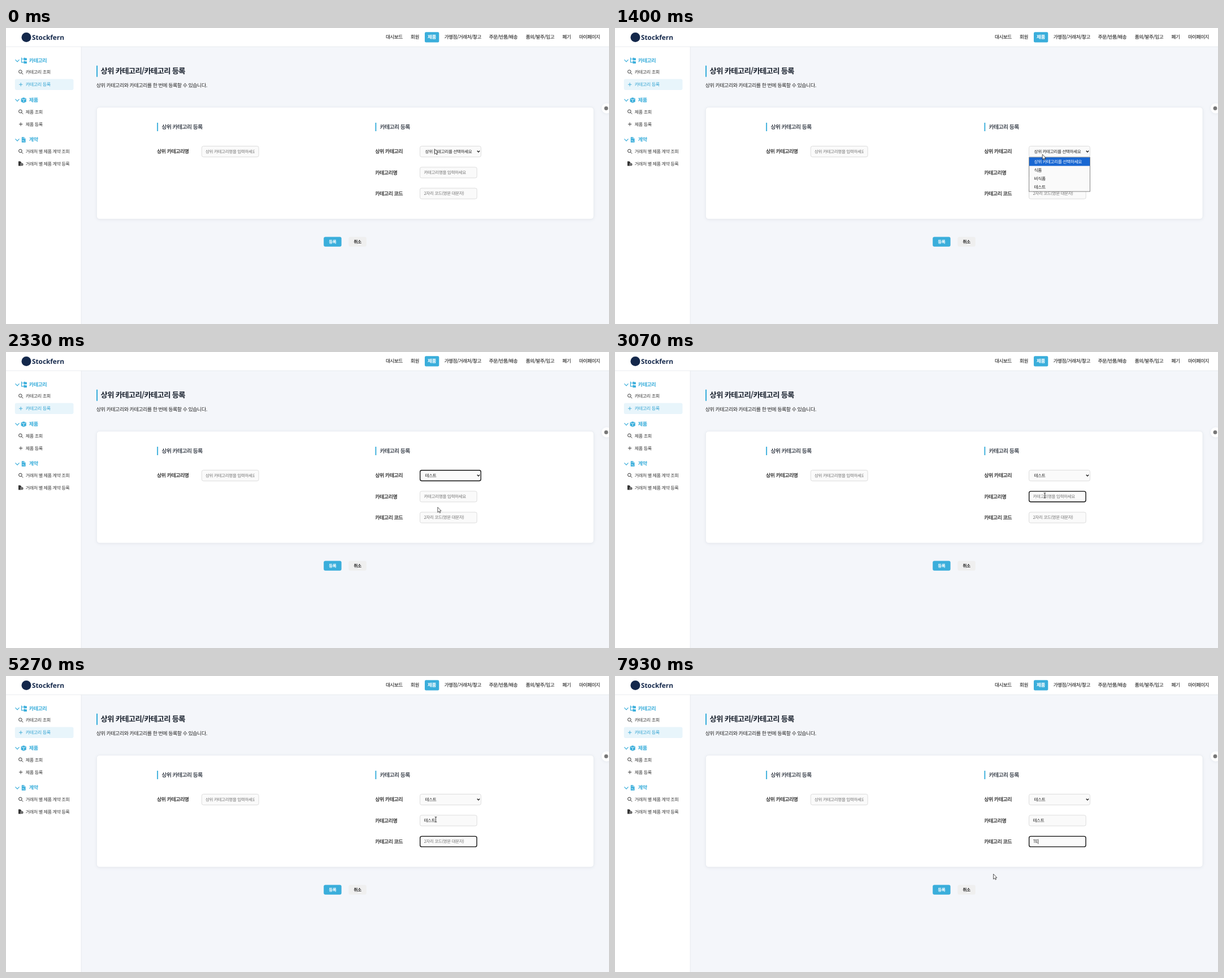
Write an HTML page that moves like this. It is 1067x525 px and loops after 8 s.

```html
<!DOCTYPE html>
<html lang="ko">
<head>
<meta charset="utf-8">
<title>카테고리 등록</title>
<style>
  html, body { margin: 0; width: 100%; height: 100%; overflow: hidden; background: #f4f6fa; }
  svg.stage { display: block; width: 100vw; height: 100vh; }
  text {
    font-family: "Noto Sans CJK KR", "Noto Sans KR", "Noto Sans CJK", sans-serif;
    letter-spacing: -.056em;
    text-rendering: geometricPrecision; fill: #222; white-space: pre;
  }
  .brand { font: 700 11.8px "Open Sans", sans-serif; letter-spacing: 0; fill: #14284b; }
  .nav text { font-size: 8.6px; stroke: #222; stroke-width: .08; }
  .nav text.on { fill: #fff; stroke: none; font-weight: 700; }
  .side text { font-size: 8.13px; fill: #3a3a3a; }
  .side text.on { fill: #38a6d3; }
  .side text.group { font-size: 9.08px; font-weight: 600; fill: #3aaedb; }
  text.title { font-size: 13.4px; font-weight: 600; fill: #1c2430; }
  text.lead { font-size: 9.05px; }
  text.head { font-size: 9.85px; fill: #1c2430; stroke: #1c2430; stroke-width: .18; }
  text.label { font-size: 9px; stroke: #222; stroke-width: .22; }
  text.hint, text.value { font-size: 7.65px; }
  text.hint { fill: #757575; }
  text.option { font-size: 7.8px; }
  text.option.on { fill: #fff; }
  text.button { font-size: 7.7px; font-weight: 600; text-anchor: middle; }
  .accent { fill: #3aaedb; }
  .line { fill: none; stroke: #3aaedb; stroke-width: 1.2; }
  .dark { fill: none; stroke: #333; stroke-width: 1; }
  .field { fill: #fafafa; stroke: #d0d0d0; stroke-width: .7; }
  .ring { fill: none; stroke: #101010; stroke-width: 1.35; }
  .caret { fill: #111; }
  .card { filter: drop-shadow(0 1px 2.5px rgba(30, 50, 80, .07)); }
</style>
</head>
<body>
<svg class="stage" viewBox="0 0 1067 525" preserveAspectRatio="none">
  <defs>
    <path id="chevron" class="line" d="M16.5 -1.8l3.5 3.7l3.5-3.7"/>
    <g id="search" class="dark"><circle cx="25.4" cy="-.6" r="2.8"/><path d="M27.5 1.5l2.7 2.7"/></g>
    <path id="plus" d="M23 0h6.4M26.2-3.2v6.4" stroke-width=".9"/>
  </defs>

  <rect width="1067" height="525" fill="#f4f6fa"/>
  <path d="M0 0H1067V33H133V525H0z" fill="#fff"/>
  <path d="M0 33.2H1067M133.2 33V525" fill="none" stroke="#e4e7ec" stroke-width=".8"/>

  <circle cx="36" cy="16.4" r="8.5" fill="#14284b"/>
  <text class="brand" x="46" y="20.6">Stockfern</text>

  <g class="nav">
    <rect class="accent" x="741" y="7.2" width="25.3" height="18.2" rx="2.2"/>
    <text x="671.9" y="19.2">대시보드</text>
    <text x="716.1" y="19.2">회원</text>
    <text x="746" y="19.2" class="on">제품</text>
    <text x="775.7" y="19.2">가맹점/거래처/창고</text>
    <text x="854.8" y="19.2">주문/반품/배송</text>
    <text x="919.8" y="19.2">품의/발주/입고</text>
    <text x="984.5" y="19.2">폐기</text>
    <text x="1013.9" y="19.2">마이페이지</text>
  </g>

  <g class="side">
    <rect x="15.8" y="90.6" width="103.7" height="19.4" rx="3" fill="#e8f5fb"/>
    <use href="#chevron" y="58"/><use href="#chevron" y="128"/><use href="#chevron" y="198.4"/>

    <path class="line" d="M27.5 52.6v8.2h4M27.5 55h4"/>
    <path class="accent" d="M31.4 52.8h2.2l.7.8h2.6v3.7h-5.5zM31.4 58.4h2.2l.7.8h2.6v3.7h-5.5z"/>
    <text class="group" x="40.8" y="60.9">카테고리</text>

    <path class="accent" d="M31.2 123.2l4.6 1.7v5.8l-4.6 2.2l-4.6-2.2v-5.8z"/>
    <path d="M27.6 125.8l3.6 1.4l3.6-1.4M31.2 127.2v4.6" fill="none" stroke="#fff" stroke-width=".8"/>
    <text class="group" x="40.8" y="131">제품</text>

    <path class="accent" d="M27.8 193.6h4.2l2.6 2.6v6.8h-6.8z"/>
    <path d="M32 193.6v2.6h2.6M29 196h1.8M29 201l1.4-2l1 2h2" fill="none" stroke="#fff" stroke-width=".7"/>
    <text class="group" x="40.8" y="201.4">계약</text>

    <use href="#search" y="78"/><use href="#search" y="148.4"/><use href="#search" y="218.6"/>
    <use href="#plus" y="100.2" stroke="#38a6d3"/><use href="#plus" y="170.6" stroke="#333"/>
    <path d="M22 236.6h3.4l1.9 1.9v6h-5.3z" fill="#333"/>
    <circle cx="28.3" cy="242" r="2.5" fill="#333" stroke="#fff" stroke-width=".6"/>
    <circle cx="28.3" cy="242" r=".8" fill="#fff"/>

    <text x="34.8" y="81.1">카테고리 조회</text>
    <text x="34.8" y="103.3" class="on">카테고리 등록</text>
    <text x="34.8" y="151.5">제품 조회</text>
    <text x="34.8" y="173.6">제품 등록</text>
    <text x="34.8" y="221.7">거래처 별 제품 계약 조회</text>
    <text x="34.8" y="243.5">거래처 별 제품 계약 등록</text>
  </g>

  <rect class="accent" x="160" y="66.7" width="2.1" height="20"/>
  <text class="title" x="167.6" y="81.3">상위 카테고리/카테고리 등록</text>
  <text class="lead" x="159.8" y="105.2">상위 카테고리와 카테고리를 한 번에 등록할 수 있습니다.</text>

  <rect class="card" x="160.5" y="140.5" width="879.5" height="198.4" rx="5" fill="#fff" stroke="#e6e9ee" stroke-width=".7"/>
  <rect class="accent" x="267.2" y="168" width="1.9" height="15"/>
  <rect class="accent" x="653.4" y="168" width="1.9" height="15"/>
  <text class="head" x="275.4" y="179.1">상위 카테고리 등록</text>
  <text class="head" x="661.5" y="179.1">카테고리 등록</text>

  <text class="label" x="267.1" y="221.8">상위 카테고리명</text>
  <text class="label" x="653.3" y="221.8">상위 카테고리</text>
  <text class="label" x="653.3" y="259.7">카테고리명</text>
  <text class="label" x="653.3" y="296.9">카테고리 코드</text>

  <rect class="field" x="346.4" y="209.5" width="100.8" height="19.2" rx="3"/>
  <svg x="353" y="210" width="87" height="18"><text class="hint" x="0" y="11.8">상위 카테고리명을 입력하세요</text></svg>

  <rect class="field" x="732.5" y="209.5" width="108" height="19.2" rx="3"/>
  <path d="M833.8 217.8l2.2 2.3l2.2-2.3" fill="none" stroke="#111" stroke-width="1.3"/>
  <text class="value" x="741.6" y="221.8" data-on="0-2130">상위 카테고리를 선택하세요</text>
  <text class="value" x="741.6" y="221.8" data-on="2130-8000">테스트</text>
  <rect class="ring" x="732.7" y="209.7" width="107.6" height="18.8" rx="3" data-on="2130-2530"/>

  <rect class="field" x="732.5" y="246.9" width="100.8" height="19" rx="3"/>
  <text class="hint" x="739.5" y="259.2" data-on="0-3330">카테고리명을 입력하세요</text>
  <rect id="compose" y="252.4" width="6.8" height="8.8" fill="#c9ced4" data-on="3330-4730"/>
  <text id="name" class="value" x="739.5" y="259.4"></text>
  <rect class="ring" x="732.7" y="247.1" width="100.4" height="18.6" rx="3" data-on="2530-4730"/>
  <rect class="caret" x="739.3" y="252.4" width=".7" height="8.6" data-on="2530-3070"/>

  <rect class="field" x="732.5" y="284.1" width="100.8" height="19" rx="3"/>
  <text class="hint" x="739.5" y="296.3" data-on="0-6530">2자리 코드(영문 대문자)</text>
  <text id="code" class="value" x="739.7" y="296.3"></text>
  <rect class="ring" x="732.7" y="284.3" width="100.4" height="18.6" rx="3" data-on="4730-8000"/>
  <rect class="caret" x="739.3" y="289.4" width=".7" height="8.6" data-on="4730-5270 5800-6330"/>
  <rect class="caret" x="744.1" y="289.4" width=".7" height="8.6" data-on="6530-6730"/>
  <rect class="caret" x="748.5" y="289.4" width=".7" height="8.6" data-on="6730-7270 7800-8000"/>

  <rect class="accent" x="562.2" y="370.6" width="31.4" height="17.2" rx="3"/>
  <rect x="606.4" y="370.6" width="31.4" height="17.2" rx="3" fill="#efefef"/>
  <text class="button" x="577.8" y="382.3" style="fill:#fff">등록</text>
  <text class="button" x="622" y="382.3">취소</text>

  <circle class="card" cx="1063" cy="142.4" r="9" fill="#fff"/>
  <circle cx="1062" cy="142.4" r="3.4" fill="#777"/>

  <g data-on="1200-2130">
    <rect x="732.7" y="229.2" width="107.8" height="60.8" fill="#fafafa" stroke="#666" stroke-width=".8"/>
    <rect id="pick" x="733" y="229.5" width="107.2" height="15.1" fill="#1967d2"/>
    <text class="option" x="741.6" y="239.9">상위 카테고리를 선택하세요</text>
    <text class="option" x="741.6" y="254.9">식품</text>
    <text class="option" x="741.6" y="269.9">비식품</text>
    <text class="option" x="741.6" y="284.9">테스트</text>
  </g>

  <g id="cursor">
    <path id="arrow" d="M0 0V9.1L2.1 7.2L3.5 10.1L4.9 9.5L3.6 6.6H6.3z" fill="#fff" stroke="#111" stroke-width=".7"/>
    <path id="beam" d="M-1.9-4.4H1.9M-1.9 4.4H1.9M0-4.4V4.4" fill="none" stroke="#222" stroke-width=".85"/>
  </g>
</svg>

<script>
  const LOOP = 8000, TICK = 200 / 3;
  const $ = id => document.getElementById(id);
  const show = (el, on) => { el.style.display = on ? '' : 'none'; };

  // time, x, y of the pointer's hot spot
  const path = [
    [0, 758.4, 214.6], [200, 755.4, 217.6], [1260, 755.4, 217.6],
    [2000, 764.6, 287], [2200, 764.6, 287], [2530, 762.6, 254.3],
    [2600, 762.6, 254.3], [2660, 760.5, 254.5], [7730, 760.5, 254.5],
    [7930, 669.6, 351.2], [LOOP, 669.6, 351.2]
  ];
  const nameKeys = [[3330, 'ㅌ'], [3400, '테'], [3800, '텟'], [3930, '테스'], [4130, '테슽'], [4270, '테스트']];
  const codeKeys = [[6530, 'T'], [6730, 'TE']];

  const options = [...document.querySelectorAll('.option')];
  const timed = [...document.querySelectorAll('[data-on]')].map(el => ({
    el, spans: el.dataset.on.split(' ').map(s => s.split('-').map(Number))
  }));

  const typed = (keys, t) => keys.reduce((text, [at, next]) => t >= at ? next : text, '');

  function pointer(t) {
    const q = Math.min(LOOP, Math.floor(t / TICK + .1) * TICK);
    const i = Math.max(1, path.findIndex(p => p[0] >= q));
    const [t0, x0, y0] = path[i - 1], [t1, x1, y1] = path[i];
    const u = (q - t0) / (t1 - t0), e = u * u * (3 - 2 * u);
    return [x0 + (x1 - x0) * e, y0 + (y1 - y0) * e];
  }

  function render(t) {
    for (const { el, spans } of timed) show(el, spans.some(([a, b]) => t >= a && t < b));

    const name = typed(nameKeys, t);
    $('name').textContent = name;
    $('compose').setAttribute('x', 739.4 + 6.6 * Math.max(0, name.length - 1));
    $('code').textContent = typed(codeKeys, t);

    const [x, y] = pointer(t);
    const open = t >= 1200 && t < 2130;
    const row = Math.max(0, Math.min(3, Math.floor((y - 229.5) / 15)));
    $('pick').setAttribute('y', 229.5 + 15 * row);
    options.forEach((o, i) => o.classList.toggle('on', i === row));

    const overInput = !open && x > 732 && x < 834 && (y > 247 && y < 266 || y > 284 && y < 303);
    show($('beam'), overInput);
    show($('arrow'), !overInput);
    $('cursor').setAttribute('transform', `translate(${x} ${y})`);
  }

  const start = performance.now();
  function frame() {
    render((performance.now() - start) % LOOP);
    requestAnimationFrame(frame);
  }
  frame();
</script>
</body>
</html>
```
